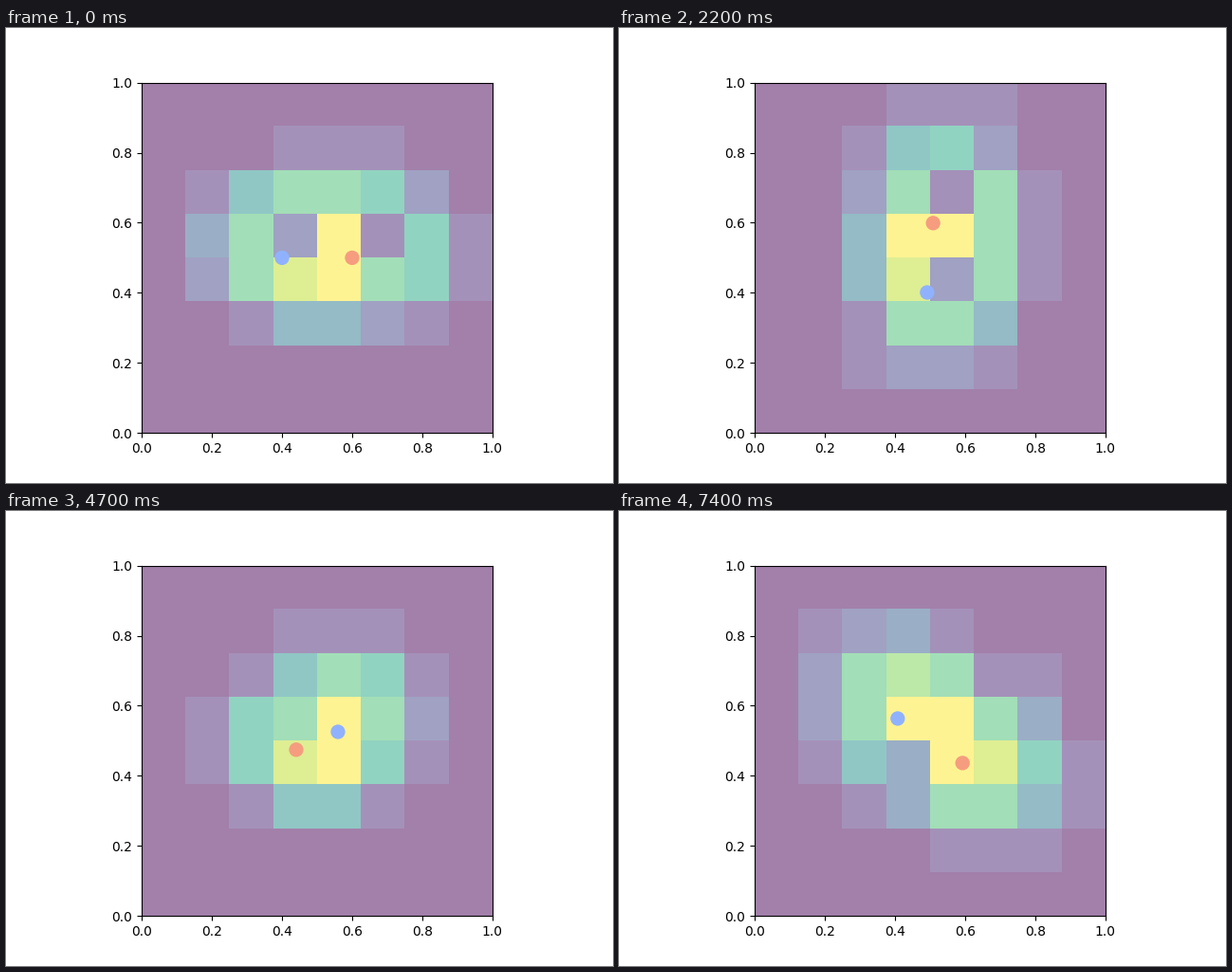
These frames come from a looping animation (640x480 px, 7.5 s). A matplotlib script:

```python
import numpy as np
import matplotlib.pyplot as plt
from matplotlib.animation import FuncAnimation

N = 8           # cells per side
FRAMES = 75
CENTRE = 0.53   # middle of the density cloud

mid = (np.arange(N) + 0.5) / N
X, Y = np.meshgrid(mid, mid)

# Smooth orbit of the red dot through a few key points; the blue one mirrors it.
times = [0, 12, 22, 38, 47, 57, 74]
orbit_x = np.polynomial.Polynomial.fit(
    times, [0.1, 0.065, 0.0085, -0.064, -0.0595, -0.011, 0.0925], 6)
orbit_y = np.polynomial.Polynomial.fit(
    times, [0, 0.0745, 0.099, 0.0395, -0.0255, -0.0805, -0.0635], 6)


def offset_at(t):
    return np.array([orbit_x(t), orbit_y(t)])


def pit(x, y):
    return np.exp(-((X - x) ** 2 + (Y - y) ** 2) / 0.00245)


def levels_at(t):
    """Cloud stretched along the line of the dots, with two thin spots inside."""
    d = offset_at(t)
    inv = np.linalg.inv(0.0144 * np.eye(2) + 1.8 * np.outer(d, d))
    dx, dy = X - CENTRE, Y - CENTRE
    dist = inv[0, 0] * dx**2 + 2 * inv[0, 1] * dx * dy + inv[1, 1] * dy**2

    # The thin spots turn against the dots around the cell above the centre.
    px, py = 0.15 * d / np.hypot(*d)
    cell = mid[N // 2]
    dist += 5 * (pit(cell + px, cell - py) + pit(cell - px, cell + py))

    # Flat top, wide shoulder, then a steep fall to a faint rim.
    level = np.interp(dist, [0.6, 1.2, 2, 3, 3.8, 4.6, 6.4, 6.7],
                      [1, 0.75, 0.7, 0.58, 0.25, 0.12, 0.1, 0])
    return np.round(level, 1)


def dots_at(t):
    d = offset_at(t)
    return np.array([0.5 - d, 0.5 + d])


fig, ax = plt.subplots(figsize=(6.4, 4.8), dpi=100)
heat = ax.imshow(levels_at(0), origin="lower", extent=(0, 1, 0, 1), cmap="viridis",
                 vmin=0, vmax=1, alpha=0.5, interpolation="nearest")
dots = ax.scatter(*dots_at(0).T, s=100, c=[0.26, 0.74], cmap="coolwarm",
                  vmin=0, vmax=1, zorder=2)
ax.set(xlim=(0, 1), ylim=(0, 1))


def update(t):
    heat.set_data(levels_at(t))
    dots.set_offsets(dots_at(t))
    return heat, dots


anim = FuncAnimation(fig, update, frames=FRAMES, interval=100, repeat=True)
plt.show()
```
